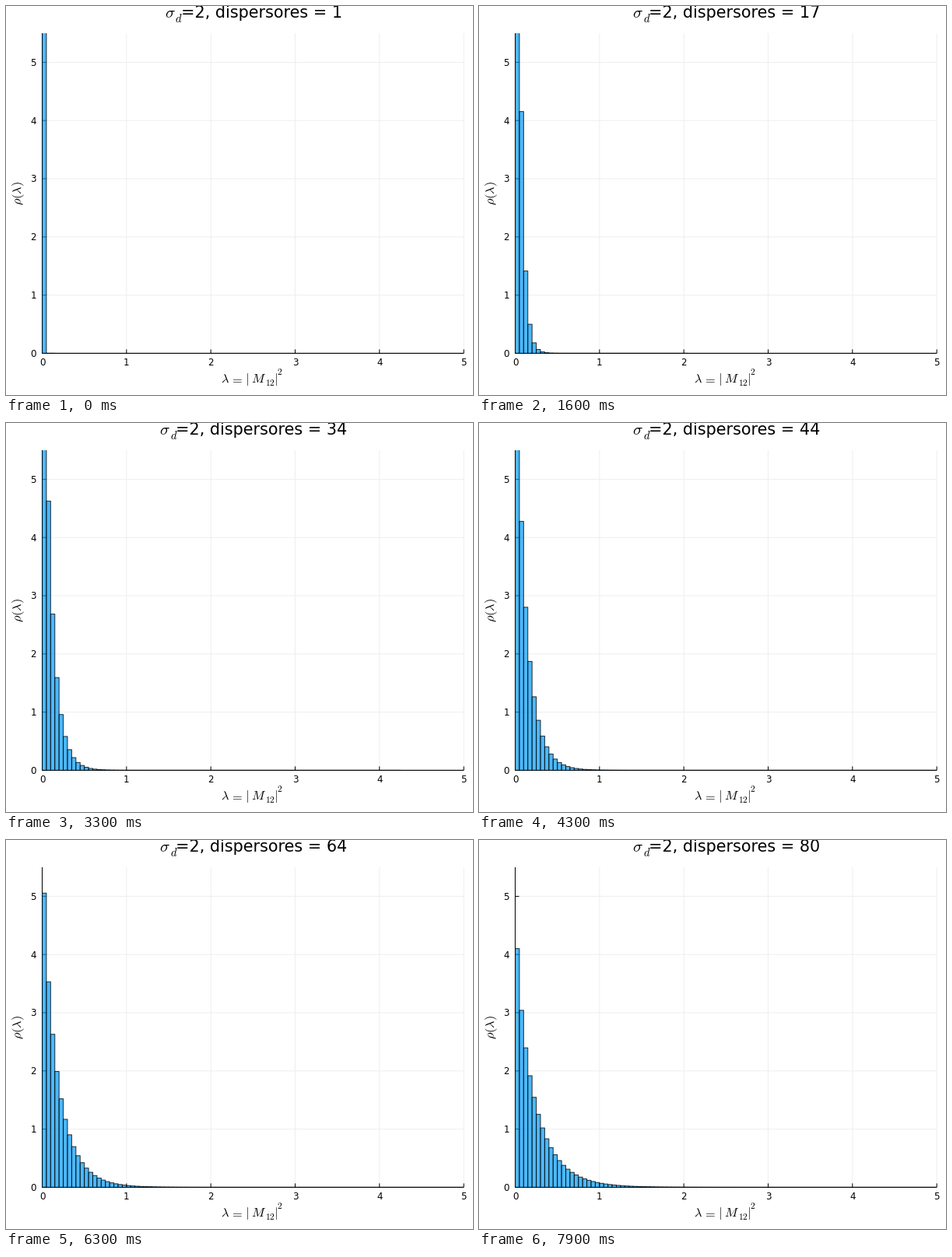
Write a matplotlib script that moves like this. It is 600x500 px and loops after 8000 ms.

```python
import numpy as np
import matplotlib.pyplot as plt
from matplotlib.animation import FuncAnimation
from matplotlib.collections import PolyCollection
from matplotlib.patches import Rectangle

W, H, DPI = 600, 500, 100
FRAMES, STEP_MS = 80, 100
BINS, BIN_W = 100, 0.05
X0, Y0, UX, UY = 46.5, 446.4, 108.33, 74.8
X_MAX, Y_MAX = 5, 5.5
TITLE, GUIDE, TICK = 20.8, 16.3, 11.9
SMALL = 0.7

plt.rcParams["font.family"] = "DejaVu Sans"
plt.rcParams["mathtext.fontset"] = "cm"


def density(n):
    """Weibull histogram whose mean grows with the number of scatterers."""
    k = np.arange(BINS + 1)
    rate = (19.8 - 0.018 * n) / n
    survival = np.exp(-rate * k ** 0.945)
    return -np.diff(survival) / BIN_W


def px(v):
    return X0 + UX * v


def py(v):
    return Y0 - UY * v


fig = plt.figure(figsize=(W / DPI, H / DPI), dpi=DPI, facecolor="white")
ax = fig.add_axes([0, 0, 1, 1])
ax.set_xlim(0, W)
ax.set_ylim(H, 0)
ax.axis("off")


def line(xs, ys, color="black", z=2):
    ax.plot(xs, ys, color=color, lw=72 / DPI, zorder=z, snap=False,
            solid_capstyle="butt")


def text(x, y, s, size, ha="left", **kw):
    return ax.text(x, y, s, fontsize=size * 72 / DPI, ha=ha, va="baseline",
                   zorder=5, **kw)


top, right = py(Y_MAX), px(X_MAX)
for v in range(X_MAX + 1):
    line([px(v)] * 2, [Y0, top], "#efefef", z=1)
    line([X0, right], [py(v)] * 2, "#efefef", z=1)
    line([px(v)] * 2, [Y0, Y0 - 5])
    line([X0, X0 + 5], [py(v)] * 2)
    text(px(v), 462, str(v), TICK, ha="center")
    text(38.8, py(v) + 4.4, str(v), TICK, ha="right")
line([X0, right], [Y0, Y0])
line([X0, X0], [Y0, top])

for x, y, s, size in [
    (276.5, 484, r"$\lambda$", GUIDE),
    (288, 484, "$=$", GUIDE),
    (306.6, 484, "$|$", GUIDE),
    (314.9, 484, "$M$", GUIDE),
    (333, 488.3, "$12$", SMALL * GUIDE),
    (343.8, 484, "$|$", GUIDE),
    (347.8, 474, "$2$", SMALL * GUIDE),
]:
    text(x, y, s, size)
text(20, 256, r"$\rho(\lambda)$", GUIDE, rotation=90, rotation_mode="anchor")

sigma = text(0, 15, r"$\sigma$", TITLE)
sub_d = text(0, 21, "$d$", SMALL * TITLE)
title = text(0, 15, "", TITLE)

bars = PolyCollection([], facecolor=(0, 0.604, 0.976, 0.7),
                      edgecolor=(0, 0, 0, 0.8), linewidth=72 / DPI, zorder=3)
bars.set_snap(False)
ax.add_collection(bars, autolim=False)
bars.set_clip_path(Rectangle((X0 - 1, top), right - X0 + 1, Y0 - top + 1,
                             transform=ax.transData))

LEFT = px(np.arange(BINS) * BIN_W)
RIGHT = LEFT + UX * BIN_W
BASE = np.full(BINS, Y0)


def update(i):
    n = i + 1
    tops = py(density(n))
    bars.set_verts(np.stack([
        np.stack([LEFT, LEFT, RIGHT, RIGHT], axis=1),
        np.stack([BASE, tops, tops, BASE], axis=1),
    ], axis=2))
    # Each digit moves the centred title left by half its width.
    x = 231.2 - 6.6 * len(str(n))
    title.set_text(f"=2, dispersores = {n}")
    title.set_x(x)
    sigma.set_x(x - 20.6)
    sub_d.set_x(x - 7.4)
    return bars, title, sigma, sub_d


anim = FuncAnimation(fig, update, frames=FRAMES, interval=STEP_MS,
                     repeat=True, repeat_delay=0, blit=False)
plt.show()
```
